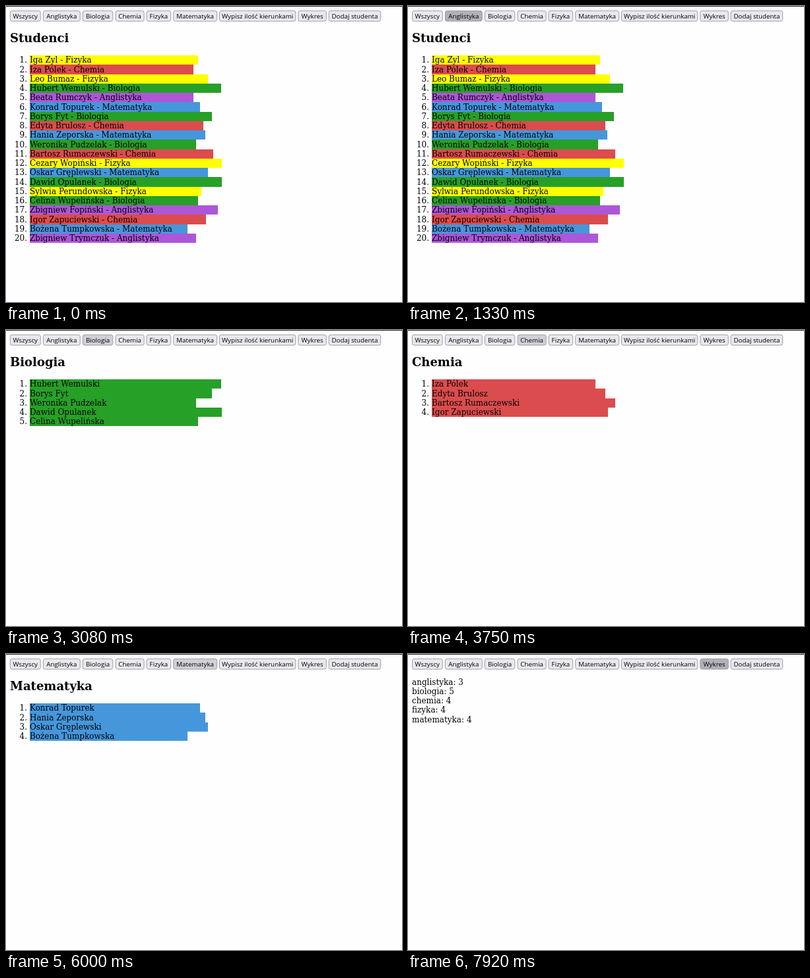
These frames come from a looping animation (600x450 px, 8000 ms). An HTML page:

```html
<!DOCTYPE html>
<html lang="pl">
<head>
<meta charset="utf-8">
<title>Studenci</title>
<style>
  html, body { margin: 0; width: 100%; height: 100%; overflow: hidden; background: #fefdff; }
  svg { display: block; width: 600px; height: 450px; font: 12px "DejaVu Serif", serif; }
  .title { font-size: 18px; font-weight: bold; }
  .button rect { fill: #e9e9ed; stroke: #8f8f9d; stroke-width: .85; }
  .button text { font: 9.8px "Open Sans", sans-serif; text-anchor: middle; }
  .button.hover rect { fill: #d0d0d7; }
  .button.active rect { fill: #b1b1b9; }
  .number { text-anchor: end; }
</style>
</head>
<body>
<svg id="stage" viewBox="0 0 600 450"></svg>
<script>
const LOOP = 8000;
const ROW = 14.25;
const colors = {
  Anglistyka: '#ae56d8',
  Biologia: '#27a027',
  Chemia: '#db4c4e',
  Fizyka: '#ffff00',
  Matematyka: '#4696db'
};

// Name, subject, right edge of the bar
const students = [
  ['Iga Zyl', 'Fizyka', 291],
  ['Iza Pólek', 'Chemia', 283.5],
  ['Leo Bumaz', 'Fizyka', 306],
  ['Hubert Wemulski', 'Biologia', 326],
  ['Beata Rumczyk', 'Anglistyka', 283.5],
  ['Konrad Topurek', 'Matematyka', 294],
  ['Borys Fyt', 'Biologia', 312],
  ['Edyta Brulosz', 'Chemia', 298.5],
  ['Hania Zeporska', 'Matematyka', 301.5],
  ['Weronika Pudzelak', 'Biologia', 288],
  ['Bartosz Rumaczewski', 'Chemia', 313.5],
  ['Cezary Wopiński', 'Fizyka', 327],
  ['Oskar Gręplewski', 'Matematyka', 306],
  ['Dawid Opulanek', 'Biologia', 327],
  ['Sylwia Perundowska', 'Fizyka', 296],
  ['Celina Wupelińska', 'Biologia', 291],
  ['Zbigniew Fopiński', 'Anglistyka', 321],
  ['Igor Zapuciewski', 'Chemia', 303],
  ['Bożena Tumpkowska', 'Matematyka', 274.5],
  ['Zbigniew Trymczuk', 'Anglistyka', 288]
];

// Label, left edge, right edge
const buttons = [
  ['Wszyscy', 6.4, 52.3],
  ['Anglistyka', 56.4, 112.3],
  ['Biologia', 116.4, 161.8],
  ['Chemia', 166.2, 209.2],
  ['Fizyka', 213.2, 249.7],
  ['Matematyka', 253.7, 319.6],
  ['Wypisz ilość kierunkami', 323.5, 438.8],
  ['Wykres', 442.8, 485.3],
  ['Dodaj studenta', 489.2, 567.7]
];

// Start in ms, visible view, button under the pointer, pressed
const steps = [
  [0, 'Studenci', -1, false],
  [750, 'Studenci', 1, false],
  [1250, 'Studenci', 1, true],
  [1420, 'Anglistyka', 1, false],
  [2080, 'Anglistyka', 2, false],
  [2580, 'Anglistyka', 2, true],
  [2750, 'Biologia', 2, false],
  [3170, 'Biologia', 3, false],
  [3500, 'Biologia', 3, true],
  [3670, 'Chemia', 3, false],
  [4080, 'Chemia', 4, false],
  [4420, 'Chemia', 4, true],
  [4580, 'Fizyka', 4, false],
  [5000, 'Fizyka', 5, false],
  [5420, 'Fizyka', 5, true],
  [5580, 'Matematyka', 5, false],
  [6170, 'Matematyka', 6, false],
  [6500, 'Matematyka', 6, true],
  [6670, 'counts', 6, false],
  [7330, 'counts', 7, false],
  [7830, 'counts', 7, true]
];

const stage = document.getElementById('stage');

function add(parent, tag, attributes, content = '') {
  const node = document.createElementNS(stage.namespaceURI, tag);
  for (const [key, value] of Object.entries(attributes)) node.setAttribute(key, value);
  node.textContent = content;
  return parent.appendChild(node);
}

function addList(view, title) {
  const all = title === 'Studenci';
  add(view, 'text', { x: 6, y: 55, class: 'title' }, title);
  students.filter(([, subject]) => all || subject === title)
    .forEach(([name, subject, right], i) => {
      const y = 75 + i * ROW;
      const baseline = y + 11.4;
      add(view, 'rect', {
        x: 36, y, width: right - 36, height: ROW,
        fill: colors[subject], 'shape-rendering': 'crispEdges'
      });
      add(view, 'text', { x: 32, y: baseline, class: 'number' }, `${i + 1}.`);
      add(view, 'text', { x: 36, y: baseline }, all ? `${name} - ${subject}` : name);
    });
}

function addCounts(view) {
  Object.keys(colors).forEach((subject, i) => {
    const count = students.filter(student => student[1] === subject).length;
    add(view, 'text', { x: 6, y: 46.7 + i * ROW }, `${subject.toLowerCase()}: ${count}`);
  });
}

add(stage, 'rect', { width: 600, height: 1, fill: '#2c2b2e' });

const buttonNodes = buttons.map(([label, left, right]) => {
  const group = add(stage, 'g', { class: 'button' });
  add(group, 'rect', { x: left, y: 7.3, width: right - left, height: 15.8, rx: 2.8 });
  add(group, 'text', { x: (left + right) / 2, y: 18.7 }, label);
  return group;
});

const views = {};
for (const name of ['Studenci', ...Object.keys(colors), 'counts']) {
  views[name] = add(stage, 'g', {});
  if (name === 'counts') addCounts(views[name]);
  else addList(views[name], name);
}

let shown;
function show(step) {
  if (step === shown) return;
  shown = step;
  const [, current, target, pressed] = step;
  for (const name in views) {
    views[name].setAttribute('display', name === current ? 'inline' : 'none');
  }
  buttonNodes.forEach((node, i) => {
    node.classList.toggle('hover', i === target && !pressed);
    node.classList.toggle('active', i === target && pressed);
  });
}

const start = performance.now();
function tick() {
  const time = (performance.now() - start) % LOOP;
  show(steps.findLast(([from]) => from <= time));
  requestAnimationFrame(tick);
}
tick();
</script>
</body>
</html>
```
